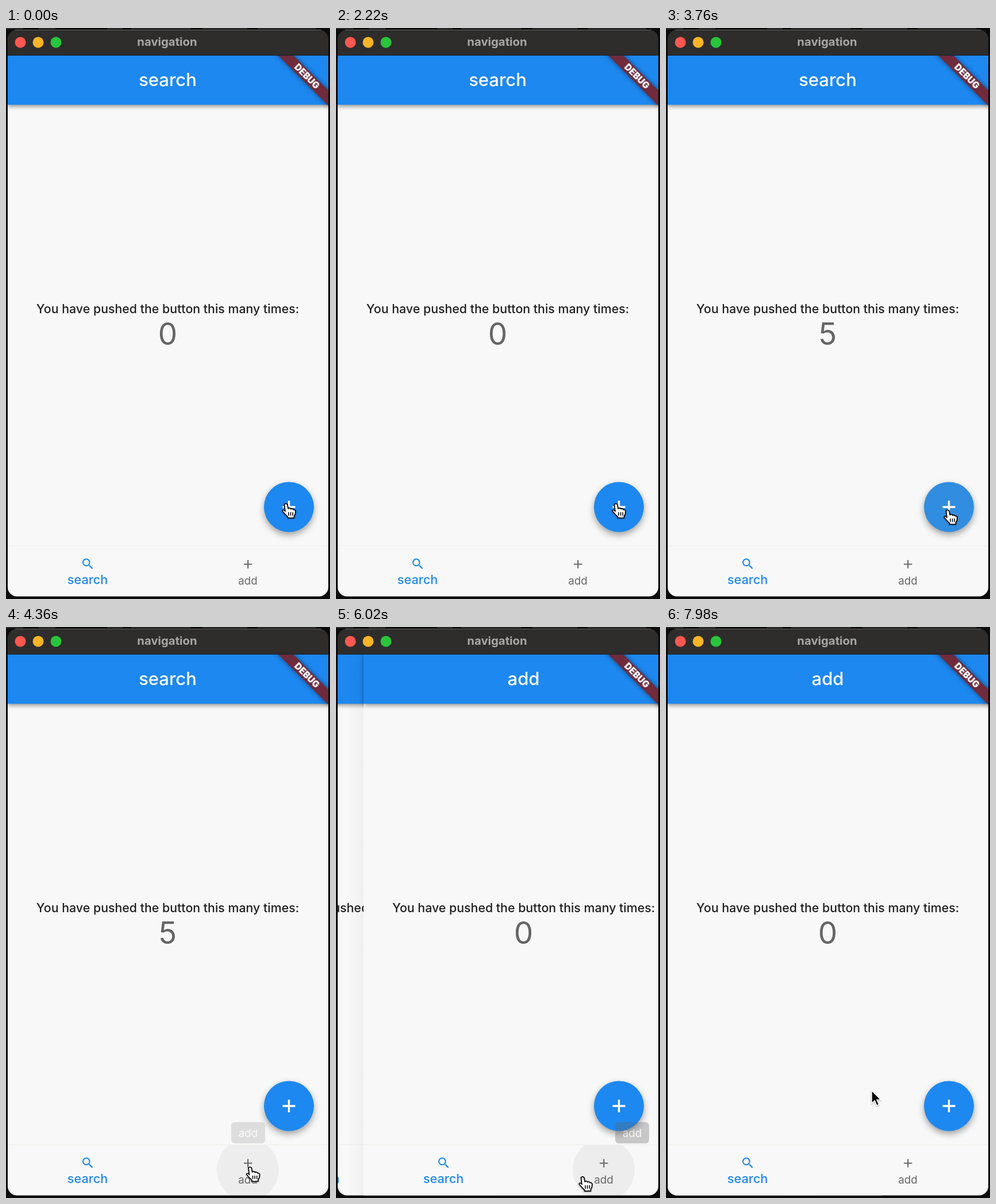
Write an HTML page that moves like this. It is 564 px wide and 993 px high and loops after 8 s.

```html
<!DOCTYPE html>
<html lang="en">
<head>
<meta charset="utf-8">
<title>navigation</title>
<style>
  html, body { margin: 0; width: 100%; height: 100%; overflow: hidden; background: #0c0c0c; }
  svg { display: block; width: 100vw; height: 100vh; }
  text { font-family: Inter, Roboto, sans-serif; text-anchor: middle; }
  .title { font-size: 31px; font-weight: 500; fill: #fff; }
  .body { font-size: 21.35px; font-weight: 500; fill: #1f1f1f; }
  .count { font-size: 53px; fill: #656565; }
  .tab { font-size: 18.8px; fill: #676767; }
  .tab.on { font-size: 21.7px; font-weight: 500; fill: #1d88f0; }
  .bar { filter: drop-shadow(0 3px 3.5px rgba(0, 0, 0, .4)); }
  .fab { filter: drop-shadow(0 5px 6px rgba(0, 0, 0, .36)); }
  .cursor { filter: drop-shadow(0 1px 1px rgba(0, 0, 0, .35)); }
</style>
</head>
<body>
<svg viewBox="0 0 564 993" preserveAspectRatio="none">
  <defs>
    <clipPath id="window"><rect x="3" y="3" width="558" height="985.5" rx="16"/></clipPath>
    <clipPath id="content"><rect x="3" y="47" width="558" height="942"/></clipPath>
    <clipPath id="tabs"><rect x="3" y="901" width="558" height="88"/></clipPath>
    <linearGradient id="edge">
      <stop offset="0" stop-opacity="0"/>
      <stop offset="1" stop-opacity=".035"/>
    </linearGradient>
  </defs>

  <rect width="564" height="993" fill="#0c0c0c"/>
  <path d="M0 1H30M57 1H86M176 1H203M218 1H322M342 1H420M438 1H540" stroke="#383838" stroke-width="1.5"/>

  <g clip-path="url(#window)">
    <rect x="3" y="3" width="558" height="45" fill="#2e2d2c"/>
    <circle cx="25" cy="25" r="9.5" fill="#ff5850"/>
    <circle cx="56" cy="25" r="9.5" fill="#fdb426"/>
    <circle cx="87" cy="25" r="9.5" fill="#29c53c"/>
    <text x="280.5" y="31" font-size="20.3" font-weight="700" fill="#a8a7a4">navigation</text>

    <g clip-path="url(#content)">
      <g id="pages"></g>
      <g class="fab">
        <circle id="fab" cx="492.5" cy="833" r="43.5" fill="#1d88f0"/>
      </g>
      <path d="M481.5 833h22M492.5 822v22" stroke="#fff" stroke-width="3.4"/>
      <g transform="translate(561 47) rotate(45)" style="filter:drop-shadow(0 0 4px rgba(0,0,0,.5))">
        <rect x="-80" y="43.5" width="160" height="18.6" fill="#702b3c"/>
        <text y="57.8" font-size="15.5" font-weight="900" fill="#fff">DEBUG</text>
      </g>
    </g>
    <g id="tooltip">
      <rect x="-29.5" y="861" width="59" height="37" rx="6" fill="#616161" fill-opacity=".93"/>
      <text y="887" font-size="18.8" fill="#fff">add</text>
    </g>
  </g>
  <path d="M16 3.5H548" stroke="#656562"/>
  <path d="M3 47.5H561" stroke="#15212c"/>

  <g id="hand" class="cursor" stroke="#000" stroke-width="1.7" stroke-linejoin="round">
    <path fill="#fff" d="M-2.4 2.5C-2.4-.5 2.6-.5 3 2.5L4.3 9C5 7.5 8.5 7.5 9 9.6 10 8.4 13 8.8 13.2 10.8 14.5 10 17 11 17 13.5L16.3 19 14.5 21.5V25H3.5V23L-1.5 18-5.5 13.5C-6.5 11-3 10-1 13.5Z"/>
    <path d="M5 15v6M8.6 15v6M12.2 15v6" stroke-width="1.5"/>
  </g>
  <path id="arrow" class="cursor" d="M0 0V22.5L5.2 17.6 8.8 26 12.6 24.4 9 16.2H16Z" fill="#000" stroke="#fff" stroke-width="1.5"/>
</svg>

<script>
const LOOP = 8000, STEP = 20, WIDTH = 558;
const TAP = 5570, SLIDE = 903;
const CLICKS = [2270, 2400, 2530, 2660, 2790];
const SEARCH_ICON = 'M15.5 14h-.79l-.28-.27A6.47 6.47 0 0 0 16 9.5 6.5 6.5 0 1 0 9.5 16c1.61 0 3.09-.59 4.23-1.57l.27.28v.79l5 4.99L20.49 19l-4.99-5zm-6 0C7.01 14 5 11.99 5 9.5S7.01 5 9.5 5 14 7.01 14 9.5 11.99 14 9.5 14z';

// Pointer tip: time, x, y
const POINTER = [
  [0, 487, 827], [2800, 487, 827], [2920, 490, 838], [3900, 490, 838],
  [4260, 424.5, 939], [5200, 424.5, 939], [5500, 430, 957], [6000, 430, 957],
  [6400, 290, 789], [7100, 290, 789], [7800, 358, 806], [8000, 358, 806]
];

const $ = id => document.getElementById(id);
const clamp = v => Math.min(1, Math.max(0, v));
const ramp = (t, from, length) => clamp((t - from) / length);
const smooth = v => v * v * (3 - 2 * v);
const move = (el, x, y = 0) => el.setAttribute('transform', `translate(${x} ${y})`);
const show = (el, on) => el.setAttribute('visibility', on ? 'visible' : 'hidden');

function bezier(x1, y1, x2, y2) {
  const at = (a, b, u) => 3 * (1 - u) ** 2 * u * a + 3 * (1 - u) * u * u * b + u ** 3;
  return x => {
    let low = 0, high = 1;
    for (let i = 0; i < 24; i++) {
      const mid = (low + high) / 2;
      if (at(x1, x2, mid) < x) low = mid; else high = mid;
    }
    return at(y1, y2, low);
  };
}
const slideEase = bezier(.35, .91, .33, .97);

function pointerAt(t) {
  const i = POINTER.findIndex((p, n) => n && t <= p[0]);
  const [t0, x0, y0] = POINTER[i - 1], [t1, x1, y1] = POINTER[i];
  const k = smooth(ramp(t, t0, t1 - t0));
  return [x0 + (x1 - x0) * k, y0 + (y1 - y0) * k];
}

function page(name) {
  const g = document.createElementNS('http://www.w3.org/2000/svg', 'g');
  g.innerHTML = `
    <rect x="-25" y="47" width="28" height="942" fill="url(#edge)"/>
    <rect x="3" y="47" width="558" height="942" fill="#f8f8f8"/>
    <rect class="bar" x="3" y="47" width="558" height="86.5" fill="#1d88f0"/>
    <text class="title" x="281.5" y="101">${name}</text>
    <text class="body" x="281.5" y="496">You have pushed the button this many times:</text>
    <text class="count" x="281.5" y="550.5">0</text>
    <path d="M3 900.5H561" stroke="#ededeb"/>
    <g clip-path="url(#tabs)"><circle class="ink" cx="421" cy="944" r="54"/></g>
    <path transform="translate(129.8 919.4) scale(1.05)" fill="#1d88f0" d="${SEARCH_ICON}"/>
    <text class="tab on" x="142" y="966.5">search</text>
    <path d="M414 932.5h14.4M421.2 925.3v14.4" stroke="#676767" stroke-width="2.1"/>
    <text class="tab" x="421" y="967.5">add</text>`;
  $('pages').append(g);
  return {
    g,
    count: g.querySelector('.count'),
    ink: g.querySelector('.ink')
  };
}

const first = page('search'), second = page('add');

function draw(t) {
  const progress = slideEase(ramp(t, TAP, SLIDE));
  move(first.g, -WIDTH / 3 * progress);
  move(second.g, WIDTH * (1 - progress));
  show(second.g, t > TAP);

  first.count.textContent = CLICKS.filter(c => t >= c).length;
  first.ink.setAttribute('fill-opacity', .045 * ramp(t, 4190, 90) + .065 * ramp(t, TAP - 90, 180));
  second.ink.setAttribute('fill-opacity', .045 * (ramp(t, 5880, 90) - ramp(t, 6100, 90)));

  const glow = ramp(t, CLICKS[0], 250) - ramp(t, 3980, 120);
  const mix = (a, b) => Math.round(a + (b - a) * glow);
  $('fab').setAttribute('fill', `rgb(${mix(29, 49)},${mix(136, 141)},${mix(240, 223)})`);

  const firstTip = smooth(ramp(t, 4285, 270)) - smooth(ramp(t, TAP - 100, 130));
  const secondTip = smooth(ramp(t, 5913, 270)) - smooth(ramp(t, 6440, 140));
  move($('tooltip'), t < TAP + 100 ? 421.5 : 515.5);
  $('tooltip').setAttribute('opacity', Math.max(firstTip, secondTip));

  const [x, y] = pointerAt(t);
  const overFab = Math.hypot(x - 492.5, y - 833) < 43.5;
  const pointing = overFab || y > 901;
  show($('hand'), pointing);
  show($('arrow'), !pointing);
  move($('hand'), x, y);
  move($('arrow'), x, y);
}

const start = performance.now();
function tick() {
  const elapsed = Math.round((performance.now() - start) / STEP) * STEP;
  draw(elapsed % LOOP);
  requestAnimationFrame(tick);
}
tick();
</script>
</body>
</html>
```
